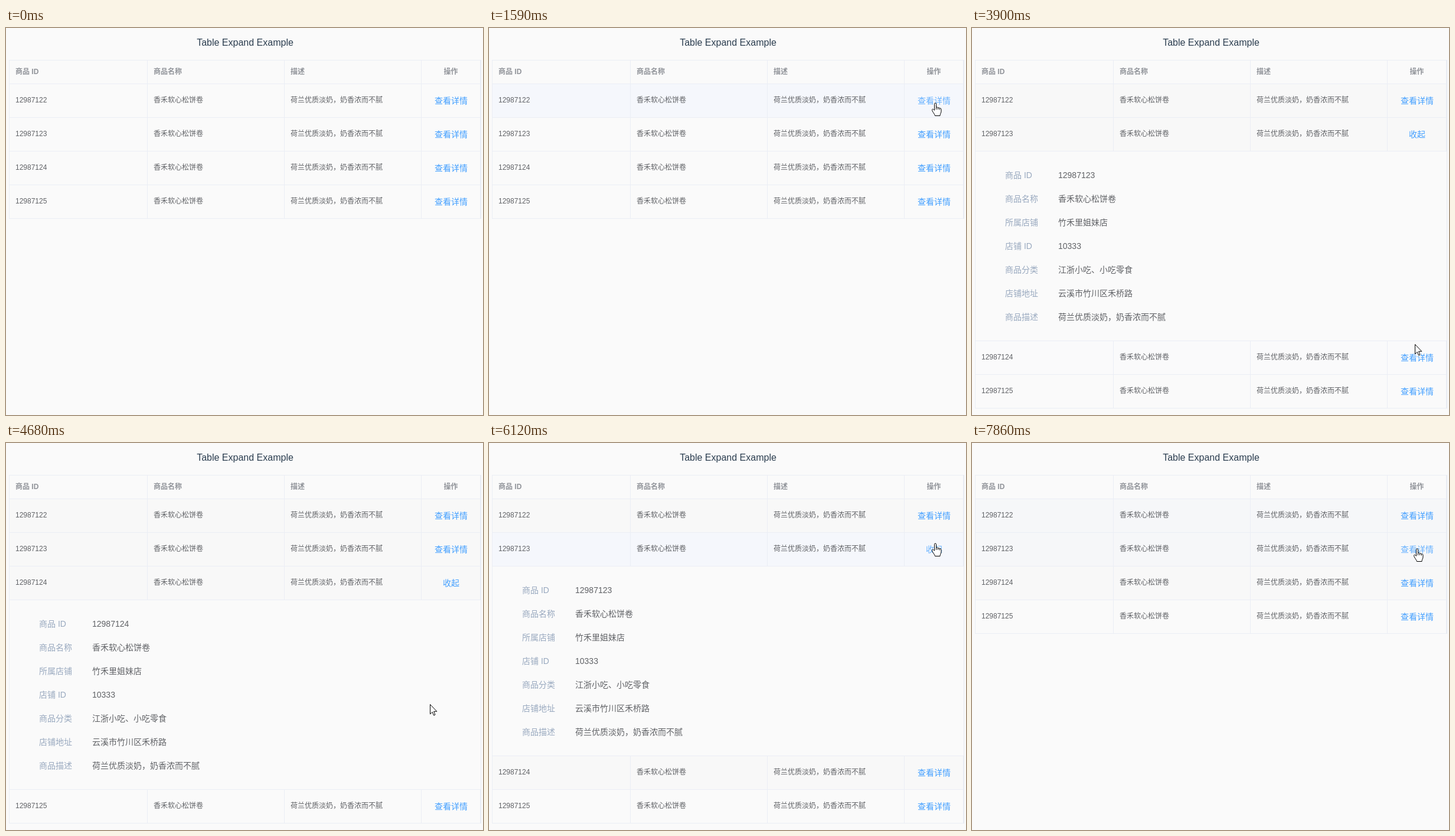
An HTML page for the animation above (8 s loop, 808 by 655 pixels).

```html
<!DOCTYPE html>
<html lang="zh-CN">
<head>
<meta charset="utf-8">
<title>Table Expand Example</title>
<style>
html, body { margin: 0; width: 100%; height: 100%; overflow: hidden; background: #fafafa; }
svg { display: block; font: 12px "Liberation Sans", Arial, "Noto Sans CJK SC", "Noto Sans CJK", sans-serif; }
text { fill: #606266; white-space: pre; }
.title { font-size: 16px; fill: #2c3e50; }
.head { font-weight: bold; fill: #909399; }
.link, .label, .value { font-size: 14px; }
.label { fill: #99a9bf; }
.mid { text-anchor: middle; }
.line { fill: #ebeef5; }
.edge { fill: #e6e9f0; }
.seen { fill: #f8f8f8; }
.hover { fill: #f5f7fc; }
.cursor { fill: #fff; stroke: #000; stroke-linejoin: round; }
</style>
</head>
<body>
<svg id="stage" width="808" height="655" viewBox="0 0 808 655"></svg>
<script>
const LOOP = 8000, STEP = 30, PRESS = 120, FADE = 8;
const HEAD = 54, TOP = 95, ROW = 57, DETAIL = 321, ROWS = 4;
const ID = 12987122, NAME = '香禾软心松饼卷', DESC = '荷兰优质淡奶，奶香浓而不腻';

// Pointer moves: start and end time, end point
const moves = [
  [210, 480, 763, 127], [960, 1080, 756, 127], [2560, 3060, 756, 500],
  [3780, 4050, 756, 555], [4560, 5190, 756, 170], [6120, 6420, 746, 268],
  [6420, 6720, 752, 186], [7260, 7440, 757, 274], [7440, 7680, 756, 122],
  [7680, 7860, 754, 179]
];
const entry = [790, 61];

const HAND = 'M-1.5 1.5a1.5 1.5 0 0 1 3 0V7.5c1-.8 2.8-.5 3 .6 1-.6 2.7-.2 2.9.9 1.2-.5 2.6 0 2.6 1.4V14c0 3-2 4-2 7.5H-.5C-.5 19-5.5 14.5-5.5 11.5c0-1.6 2-1.8 4 .8zM1.5 7.5V11M4.5 8v3M7.4 9v2.5';
const ARROW = 'M.5.5V16.8L4.2 13.3 6.7 19 9 18 6.6 12.3H11.8z';

const stage = document.getElementById('stage');

function add(parent, tag, attrs, label = '') {
  const el = document.createElementNS('http://www.w3.org/2000/svg', tag);
  for (const key in attrs) el.setAttribute(key, attrs[key]);
  el.textContent = label;
  return parent.appendChild(el);
}
const text = (parent, x, y, label, cls = '') => add(parent, 'text', { x, y, class: cls }, label);
const box = (parent, x, y, width, height, cls) => add(parent, 'rect', { x, y, width, height, class: cls });
const shift = (el, x, y) => el.setAttribute('transform', `translate(${x} ${y})`);

function cells(parent, height, labels, y, cls) {
  for (const x of [239, 471, 703, 803]) box(parent, x, 0, 1, height, 'line');
  box(parent, 5, height - 1, 800, 1, 'line');
  labels.forEach((label, i) => text(parent, i ? 18 + 232 * i : 16, y, label, cls));
}

text(stage, 405, 30, 'Table Expand Example', 'title mid');
const head = add(stage, 'g', {});
shift(head, 0, HEAD);
box(head, 5, 0, 800, 1, 'line');
cells(head, TOP - HEAD, ['商品 ID', '商品名称', '描述'], 24, 'head');
text(head, 753.5, 24, '操作', 'head mid');

const rows = Array.from({ length: ROWS }, (_, i) => {
  const g = add(stage, 'g', {});
  const [seen, hover] = ['seen', 'hover'].map(cls => box(g, 6, 0, 798, ROW - 1, cls));
  cells(g, ROW, [ID + i, NAME, DESC], 31);
  return { g, seen, hover, link: text(g, 754, 33, '', 'link mid') };
});

const detail = add(stage, 'g', {});
const values = [
  ['商品 ID', ''], ['商品名称', NAME], ['所属店铺', '竹禾里姐妹店'], ['店铺 ID', '10333'],
  ['商品分类', '江浙小吃、小吃零食'], ['店铺地址', '云溪市竹川区禾桥路'], ['商品描述', DESC]
].map(([label, value], i) => {
  const y = 45 + 40 * i;
  text(detail, 56, y, label, 'label');
  return text(detail, 146, y, value, 'value');
});
box(detail, 5, DETAIL - 1, 800, 1, 'line');

const sides = [box(stage, 5, HEAD, 1, 0, 'line'), box(stage, 804, HEAD, 1, 0, 'edge')];
const cursor = add(stage, 'path', { class: 'cursor' });

const rowTop = (i, open) => TOP + ROW * i + (open >= 0 && i > open ? DETAIL : 0);

// Each move slows down at its end and bows to the left
function pointer(t) {
  if (t < moves[0][0]) return null;
  let [x, y] = entry;
  for (const [from, to, endX, endY] of moves) {
    if (t < from) break;
    const k = Math.sin(Math.min(1, (t - from) / (to - from)) * Math.PI / 2);
    const bow = 0.122 * Math.abs(endY - y) * Math.sin(Math.PI * k);
    x += (endX - x) * k - bow;
    y += (endY - y) * k;
  }
  return [Math.round(x), Math.round(y)];
}

function rowAt(t, open) {
  const p = pointer(t);
  return rows.findIndex((_, i) => {
    const y = p ? p[1] - rowTop(i, open) : -1;
    return y >= 0 && y < ROW;
  });
}

// Every click toggles the row under the pointer and closes the others
let current = -1;
const clicks = [690, 1440, 2400, 3450, 4350, 5640, 7050].map(time => {
  const row = rowAt(time, current);
  current = current === row ? -1 : row;
  return { time, row, open: current };
});

const openRow = t => clicks.reduce((open, c) => t >= c.time ? c.open : open, -1);

// Share of the last frames spent over the row
function hoverShare(i, t) {
  let n = 0;
  for (let k = 0; k < FADE; k++) {
    const past = t - k * STEP;
    if (rowAt(past, openRow(past)) === i) n++;
  }
  return n / FADE;
}

function render(t) {
  const open = openRow(t), p = pointer(t);
  let onLink = false;

  rows.forEach(({ g, seen, hover, link }, i) => {
    const y = rowTop(i, open), mine = clicks.filter(c => c.row === i);
    shift(g, 0, y);
    seen.style.opacity = mine.some(c => t >= c.time) ? 1 : 0;
    hover.style.opacity = hoverShare(i, t);

    const half = open === i ? 14 : 28;
    const hot = p && Math.abs(p[0] - 754) <= half && Math.abs(p[1] - y - 29) <= 11;
    const pressed = mine.some(c => t < c.time && t >= c.time - PRESS);
    onLink = onLink || hot;
    link.textContent = open === i ? '收起' : '查看详情';
    link.style.fill = pressed ? '#3a8ee6' : hot ? '#66b1ff' : '#409eff';
  });

  detail.style.display = open < 0 ? 'none' : '';
  shift(detail, 0, rowTop(open, open) + ROW);
  values[0].textContent = ID + open;
  for (const side of sides) side.setAttribute('height', rowTop(ROWS, open) - HEAD);

  cursor.style.display = p ? '' : 'none';
  if (p) {
    cursor.setAttribute('d', onLink ? HAND : ARROW);
    shift(cursor, ...p);
  }
}

const start = performance.now();
function tick() {
  const t = (performance.now() - start) % LOOP;
  render(Math.floor(t / STEP) * STEP);
  requestAnimationFrame(tick);
}
tick();
</script>
</body>
</html>
```
